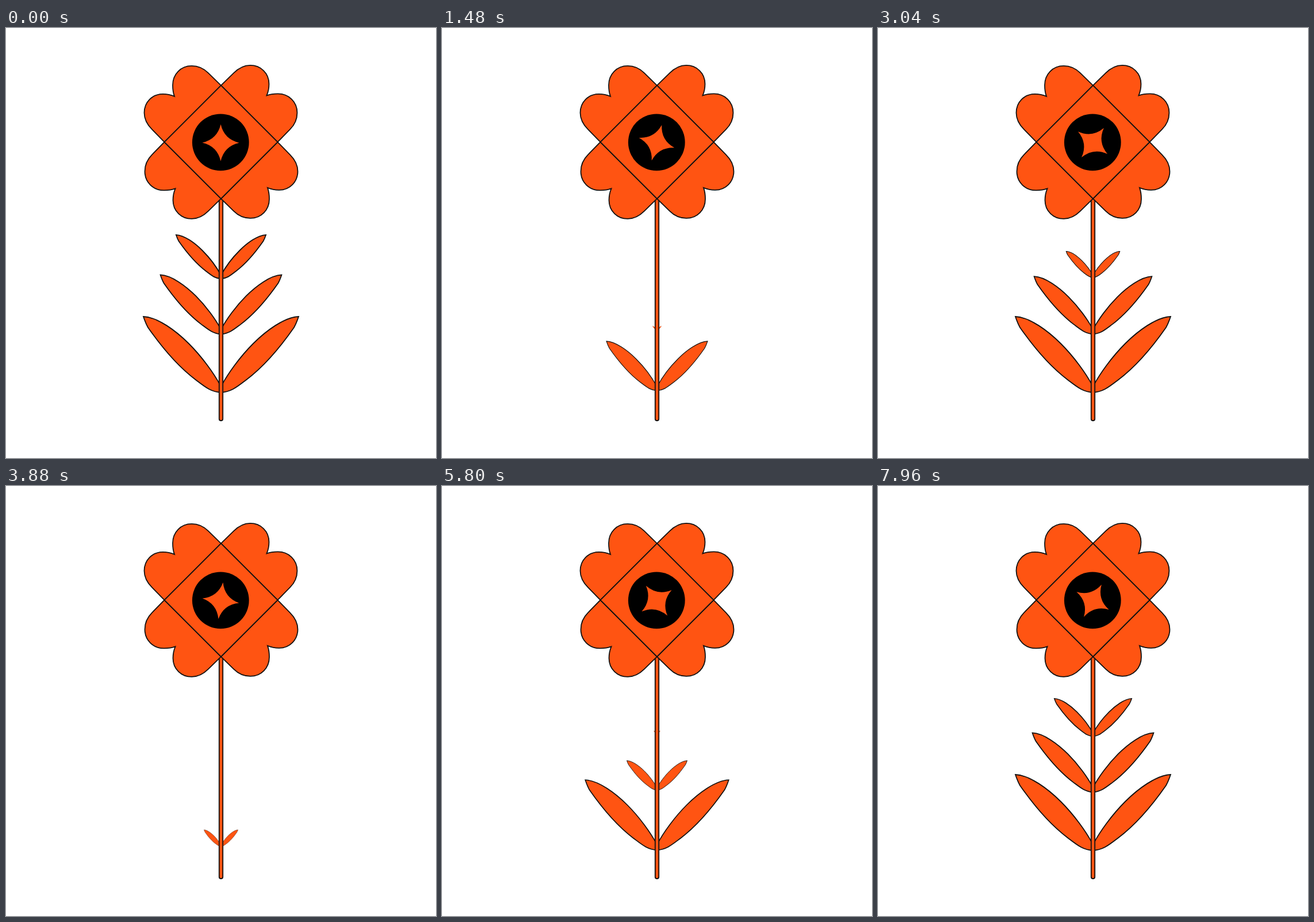
Recreate the animation shown at these times as an HTML page. Size 748 by 748 pixels, loop 8 s.

```html
<!DOCTYPE html>
<html lang="en">
<head>
<meta charset="utf-8">
<title>Flower</title>
<style>
  html, body { margin: 0; width: 100%; height: 100%; overflow: hidden; background: #fff; }
  svg { display: block; width: 100%; height: 100%; fill: #ff5412; stroke: #111; stroke-width: 1.8; }
</style>
</head>
<body>
<svg viewBox="0 0 748 748">
  <defs>
    <path id="leaf" d="M-135-123C-110-122-78-98-56-76C-33-53-12-24-1-3L0 9C-18 8-28-1-44-13C-72-34-97-61-127-104Q-131-111-135-123Z"/>
    <path id="petal" d="M-98.5 0L-120-22C-130-32-133.5-42-133.5-51C-133.5-69-120-83.5-101-83.5C-94-83.5-87-82-81-79.5C-83-85-84-93-84-99C-84-118-70-132.5-51-132.5C-39-132.5-30-128-22-120L0-98.5Z"/>
  </defs>
  <g id="leaves"></g>
  <rect x="370.8" y="297" width="6.4" height="386" rx="3"/>
  <g transform="translate(374 198.4)">
    <use href="#petal"/>
    <use href="#petal" transform="rotate(90)"/>
    <use href="#petal" transform="rotate(180)"/>
    <use href="#petal" transform="rotate(270)"/>
    <path d="M0-98.5L98.5 0L0 98.5L-98.5 0Z"/>
  </g>
  <circle cx="373.3" cy="198.8" r="49.4" fill="#000" stroke="none"/>
  <path id="star" stroke="none" d="M0-32Q6-6 32 0Q6 6 0 32Q-6 6-32 0Q-6-6 0-32Z"/>
</svg>
<script>
  const LOOP = 8000, STAR_TURN = 5040, LEAF_CYCLE = 2520;

  // Pairs from bottom to top: they fold away top first and grow back bottom first.
  const pairs = [
    { y: 625, size: 1, shrinkAt: 660, growAt: 1240 },
    { y: 525.5, size: 0.781, shrinkAt: 460, growAt: 1415 },
    { y: 431, size: 0.579, shrinkAt: 260, growAt: 1590 }
  ];
  const SHRINK = 600, GROW = 400;

  const leaves = document.getElementById('leaves');
  const star = document.getElementById('star');

  for (const pair of pairs) {
    leaves.insertAdjacentHTML('beforeend',
      `<g stroke-width="${1.8 / pair.size}"><use href="#leaf"/><use href="#leaf" transform="scale(-1 1)"/></g>`);
    pair.node = leaves.lastElementChild;
  }

  function ease(p) {
    p = Math.min(1, Math.max(0, p));
    return p * p * (3 - 2 * p);
  }

  function draw(now) {
    const time = now % LOOP;
    const phase = time % LEAF_CYCLE;
    for (const { node, y, size, shrinkAt, growAt } of pairs) {
      const open = phase < growAt
        ? 1 - ease((phase - shrinkAt) / SHRINK)
        : ease((phase - growAt) / GROW);
      node.setAttribute('transform', `translate(374 ${y}) scale(${size * open})`);
    }
    star.setAttribute('transform', `translate(373.5 199.6) rotate(${time / STAR_TURN * 360})`);
    requestAnimationFrame(() => draw(performance.now()));
  }

  draw(performance.now());
</script>
</body>
</html>
```
